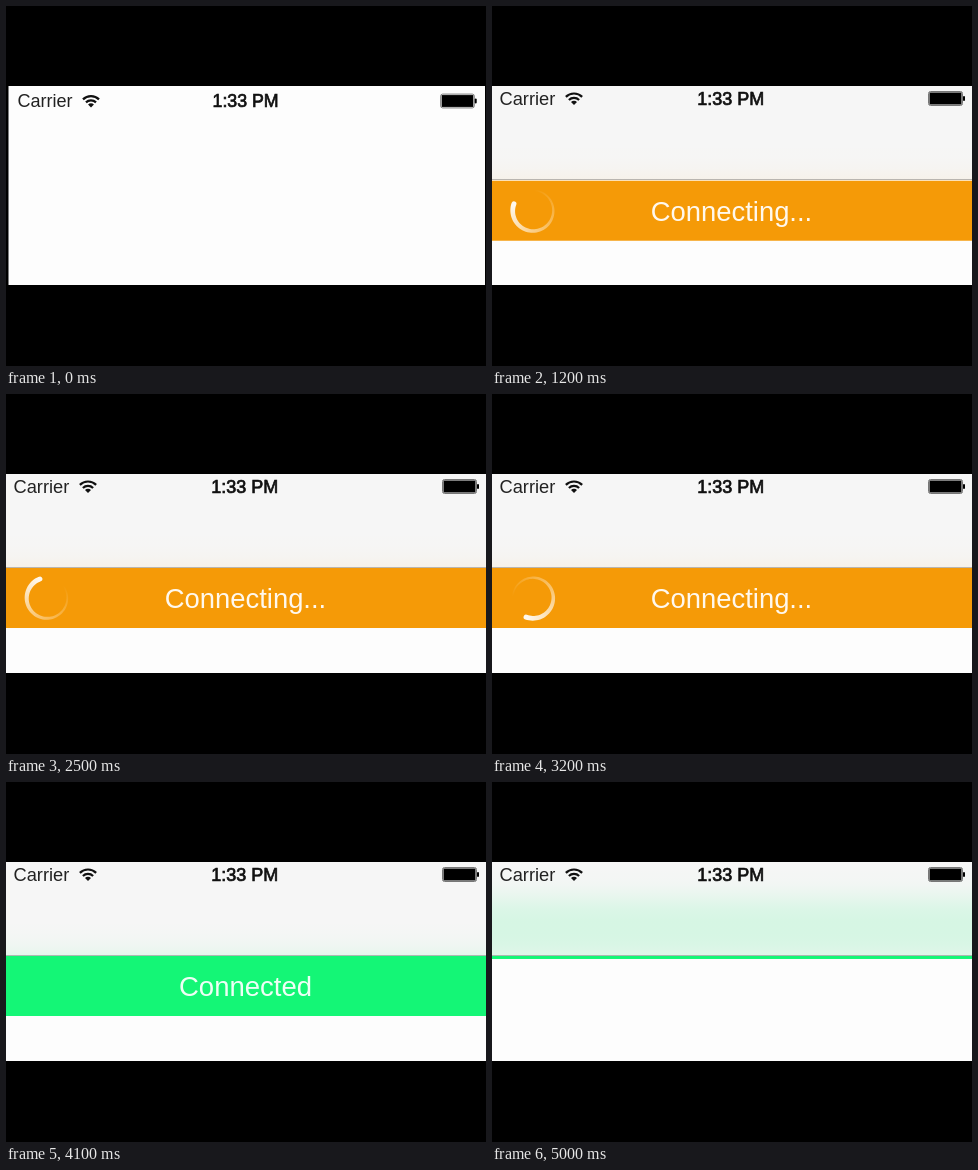
An HTML page with a canvas for the animation above (5.1 s loop, 480x360 px).

```html
<!DOCTYPE html>
<html lang="en">
<head>
<meta charset="utf-8">
<title>Connection banner</title>
<style>
  html, body { margin: 0; width: 100%; height: 100%; overflow: hidden; background: #000; }
  canvas { display: block; width: 480px; height: 360px; }
</style>
</head>
<body>
<canvas id="stage" width="480" height="360"></canvas>
<script>
const ctx = document.getElementById('stage').getContext('2d');
const LOOP = 5100, STEP = 100;
const SCREEN = { top: 80, bottom: 279 };
const NAV_BOTTOM = 174, BAND_H = 60;
const ORANGE = [245, 154, 7], GREEN = [20, 246, 118];
const FONT = '"Liberation Sans", Arial, sans-serif';

const clamp = v => Math.max(0, Math.min(1, v));
const mix = (a, b, p) => a + (b - a) * p;
const easeCos = p => (1 - Math.cos(Math.PI * clamp(p))) / 2;
const rgba = (c, a = 1) => `rgba(${c.map(Math.round).join(',')},${a})`;

// Damped spring from 0 to 1 with a small overshoot.
function spring(ms) {
  if (ms <= 0) return 0;
  const a = 0.0054 * ms, d = 0.953;
  return 1 - Math.exp(-d * a) * (Math.cos(a) + d * Math.sin(a));
}

function bandOffset(t) {
  if (t < 800) return 0;
  if (t < 4600) return BAND_H * spring(t - 752);
  return BAND_H * (1 - easeCos((t - 4640) / 420));
}

function label(text, x, y, size, color, align, weight = 0) {
  ctx.font = `${size}px ${FONT}`;
  ctx.textAlign = align;
  ctx.fillStyle = ctx.strokeStyle = color;
  ctx.fillText(text, x, y);
  if (weight) {
    ctx.lineWidth = weight;
    ctx.strokeText(text, x, y);
  }
}

function wifi(x, y) {
  const from = -Math.PI * 0.75, to = -Math.PI * 0.25;
  ctx.fillStyle = ctx.strokeStyle = '#111';
  ctx.beginPath();
  ctx.moveTo(x, y);
  ctx.arc(x, y, 4.2, from, to);
  ctx.fill();
  ctx.lineWidth = 2.2;
  for (const r of [7.2, 11.5]) {
    ctx.beginPath();
    ctx.arc(x, y, r, from, to);
    ctx.stroke();
  }
}

function battery(x, y) {
  ctx.strokeStyle = '#777';
  ctx.lineWidth = 1;
  ctx.beginPath();
  ctx.roundRect(x + 0.5, y + 0.5, 34, 14, 2);
  ctx.stroke();
  ctx.fillStyle = '#000';
  ctx.fillRect(x + 1.5, y + 1.5, 32, 12);
  ctx.beginPath();
  ctx.roundRect(x + 35, y + 5, 2, 5, 1);
  ctx.fill();
}

function statusBar(zoom) {
  const s = mix(0.9865, 1, zoom);
  ctx.save();
  ctx.translate(mix(4.1, 0, zoom), mix(3.75, 0, zoom));
  ctx.scale(s, s);
  label('Carrier', 7.5, 99, 18.3, '#222', 'left');
  wifi(82, 99);
  label('1:33 PM', 238.7, 99, 18, '#111', 'center', 0.7);
  battery(436, 85);
  ctx.restore();
}

// Tapered ring whose bright head leads clockwise.
function spinner(x, y, deg, alpha) {
  const head = deg * Math.PI / 180, span = 5, tail = head - span;
  const r = 20.3, n = 60;
  const width = p => mix(1.2, 5, p);
  const grad = ctx.createConicGradient(tail, x, y);
  grad.addColorStop(0, 'rgba(255,255,255,0)');
  grad.addColorStop(0.4, 'rgba(255,255,255,0.4)');
  grad.addColorStop(0.78, 'rgba(255,255,255,0.92)');
  grad.addColorStop(0.9, 'rgba(255,255,255,0.95)');
  grad.addColorStop(1, 'rgba(255,255,255,0)');
  const point = (p, side) => {
    const a = tail + span * p, q = r + side * width(p) / 2;
    ctx.lineTo(x + q * Math.cos(a), y + q * Math.sin(a));
  };
  ctx.save();
  ctx.globalAlpha = alpha;
  ctx.fillStyle = grad;
  ctx.beginPath();
  for (let i = 0; i <= n; i++) point(i / n, 1);
  ctx.arc(x + r * Math.cos(head), y + r * Math.sin(head), 2.5, head, head + Math.PI);
  for (let i = n; i >= 0; i--) point(i / n, -1);
  ctx.fill();
  ctx.restore();
}

function band(t, top, color, done) {
  ctx.fillStyle = rgba(color);
  ctx.fillRect(0, top, 480, BAND_H);
  if (done < 1) {
    spinner(41, top + 30, 200 + (t - 1200) * 0.315, 1 - done);
    label('Connecting...', 239.5, top + 40, 27.4, `rgba(255,255,255,${0.93 * (1 - done)})`, 'center');
  }
  if (done > 0) {
    label('Connected', 239.5, top + 40, 27.5, `rgba(255,255,255,${0.93 * done})`, 'center');
  }
}

// Translucent bar: the band shows through as a soft blurred tint.
function navBar(top, color, strength) {
  const h = NAV_BOTTOM - SCREEN.top;
  const edge = v => 1 / (1 + Math.exp(-v / 8));
  ctx.fillStyle = '#f6f6f6';
  ctx.fillRect(0, SCREEN.top, 480, h);
  if (strength > 0) {
    const grad = ctx.createLinearGradient(0, SCREEN.top, 0, NAV_BOTTOM);
    for (let i = 0; i <= 16; i++) {
      const y = SCREEN.top + h * i / 16;
      const cover = edge(y - top) - edge(y - top - BAND_H);
      grad.addColorStop(i / 16, rgba(color, (strength * cover).toFixed(4)));
    }
    ctx.fillStyle = grad;
    ctx.fillRect(0, SCREEN.top, 480, h);
  }
  ctx.fillStyle = 'rgba(0,0,0,0.25)';
  ctx.fillRect(0, NAV_BOTTOM - 1, 480, 1);
}

function draw(t) {
  const zoom = t < 200 ? 0 : t < 300 ? 0.5 : 1;
  const done = clamp((t - 3200) / 500);
  const color = ORANGE.map((v, i) => mix(v, GREEN[i], done));
  const offset = bandOffset(t);
  const top = NAV_BOTTOM - BAND_H + offset;

  ctx.fillStyle = '#000';
  ctx.fillRect(0, 0, 480, 360);
  ctx.save();
  ctx.beginPath();
  const left = mix(2.5, 0, zoom), right = mix(479, 480, zoom);
  ctx.rect(left, SCREEN.top, right - left, SCREEN.bottom - SCREEN.top);
  ctx.clip();
  ctx.fillStyle = '#fdfdfd';
  ctx.fillRect(0, SCREEN.top, 480, SCREEN.bottom - SCREEN.top);
  if (offset > 0) band(t, top, color, done);
  ctx.globalAlpha = zoom;
  if (zoom > 0) navBar(top, color, offset > 0 ? mix(0.11, 0.15, done) : 0);
  ctx.globalAlpha = 1;
  statusBar(zoom);
  ctx.restore();
}

const start = performance.now();
function frame() {
  const t = Math.max(0, performance.now() - start) % LOOP;
  draw(Math.floor(t / STEP) * STEP);
  requestAnimationFrame(frame);
}
frame();
</script>
</body>
</html>
```
